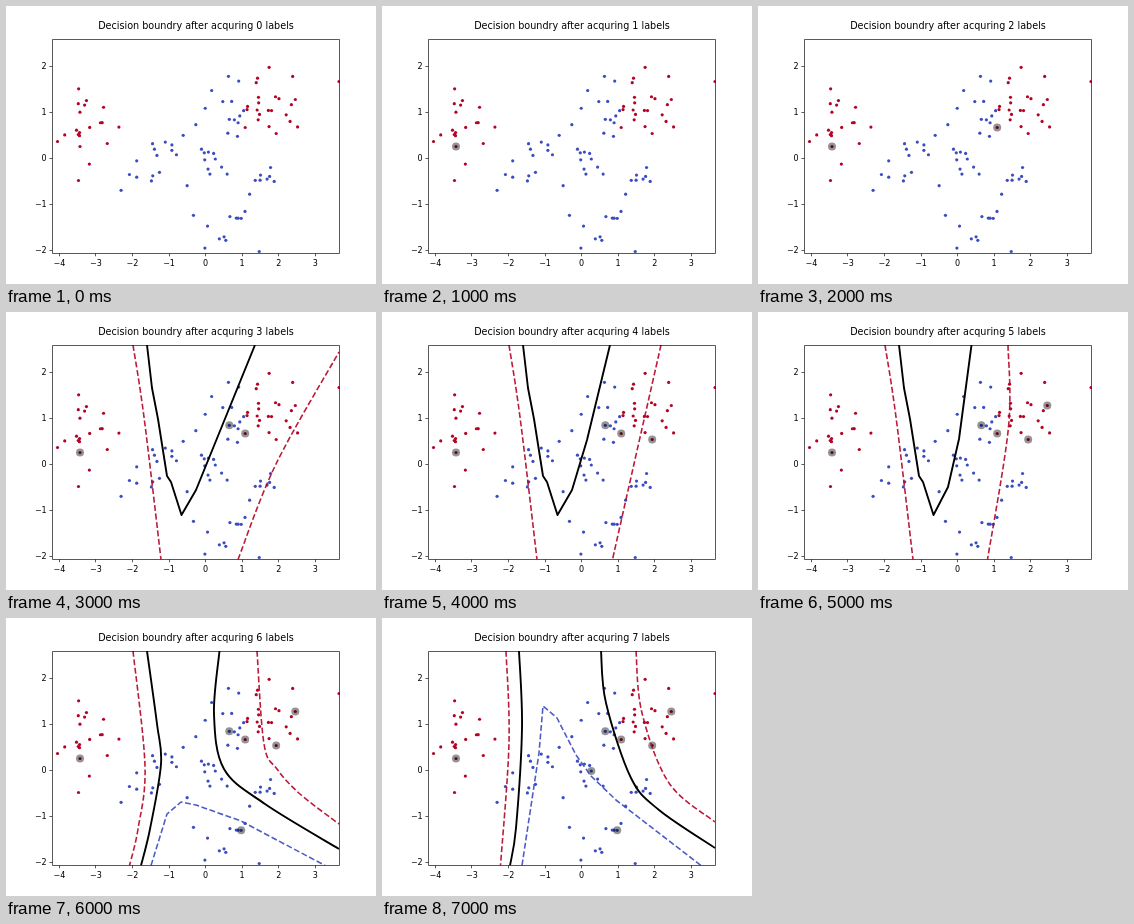
Animation of 370x278 px, one loop 8 s. Source, as an HTML page with a canvas:

```html
<!DOCTYPE html>
<html>
<head>
<meta charset="utf-8">
<style>
  html, body { margin: 0; width: 100%; height: 100%; overflow: hidden; background: #fff; }
  canvas { display: block; }
</style>
</head>
<body>
<canvas id="stage" width="370" height="278"></canvas>
<script>
const ctx = document.getElementById('stage').getContext('2d');
const STEP = 1000, STEPS = 8;
const RED = '#b40426', BLUE = '#3b4cc0', BLACK = '#000';
const TOP = 33, BOTTOM = 247.5, LEFT = 46.25, RIGHT = 333;
const toX = v => 199.6 + v * 36.55;
const toY = v => 152 - v * 46;

// Labelled points in the order they are acquired
const acquired = [
  { at: [74, 140.5], color: RED }, { at: [239.2, 121.5], color: RED },
  { at: [223.3, 113.3], color: BLUE }, { at: [270.2, 127.5], color: RED },
  { at: [289.3, 93.5], color: RED }, { at: [235.2, 212.3], color: BLUE },
  { at: [209.3, 153], color: BLUE }
];

function seededRandom(seed) {
  return () => {
    seed = (seed + 0x6D2B79F5) | 0;
    let t = Math.imul(seed ^ (seed >>> 15), 1 | seed);
    t = (t + Math.imul(t ^ (t >>> 7), 61 | t)) ^ t;
    return ((t ^ (t >>> 14)) >>> 0) / 4294967296;
  };
}

// Clouds of points, denser towards their centres
const random = seededRandom(7);
const scatter = () => random() + random() - 1;
const cloud = (color, count, x, y, rx, ry) => Array.from({ length: count }, () =>
  ({ at: [x + rx * scatter(), y + ry * scatter()], color }));

const dots = [
  ...cloud(BLUE, 15, 154, 160, 42, 36),
  ...cloud(BLUE, 13, 212, 92, 36, 48),
  ...cloud(BLUE, 10, 208, 146, 22, 34),
  ...cloud(BLUE, 8, 257, 162, 20, 40),
  ...cloud(BLUE, 11, 212, 217, 58, 36),
  ...cloud(RED, 19, 76, 130, 42, 58),
  ...cloud(RED, 20, 264, 92, 40, 60),
  { at: [RIGHT, 75.5], color: RED },
  ...acquired
];

// Contours: "smooth" ones are splines, others straight between key points
const smooth = (color, ...points) => ({ color, points, smooth: true });
const kinked = (color, ...points) => ({ color, points, smooth: false });

const leftMargin = smooth(RED, [127, TOP], [138, 105], [155, BOTTOM]);
const vee = (...rightArm) => kinked(BLACK,
  [141, TOP], [146, 76], [152, 107], [161, 164], [165, 170], [175.5, 203], ...rightArm);

const contours = {
  3: [leftMargin, vee([190, 178], [249, TOP]),
    smooth(RED, [232, BOTTOM], [270, 152], [RIGHT, 40])],
  4: [leftMargin, vee([190, 178], [205, 128], [228, TOP]),
    smooth(RED, [279, TOP], [252, 152], [230.5, BOTTOM])],
  5: [leftMargin, vee([190, 175], [201, 127], [213.5, TOP]),
    smooth(RED, [250, TOP], [250.5, 115], [229.5, BOTTOM])],
  6: [
    smooth(RED, [127, TOP], [139, 148], [132, 211], [123.5, BOTTOM]),
    smooth(RED, [251, TOP], [258, 126], [271, 151], [294, 176], [RIGHT, 206]),
    smooth(BLACK, [141, TOP], [151, 106], [155, 146], [144, 211], [135, BOTTOM]),
    smooth(BLACK, [213.5, TOP], [208, 96], [218, 151], [259, 186], [RIGHT, 231]),
    kinked(BLUE, [145, BOTTOM], [161, 196], [175, 184], [190, 187], [235, 203], [319, BOTTOM])
  ],
  7: [
    smooth(RED, [124, TOP], [127, 125], [118.5, BOTTOM]),
    smooth(RED, [254, TOP], [260, 95], [287, 165], [RIGHT, 204]),
    smooth(BLACK, [137, TOP], [140, 110], [134, 210], [128, BOTTOM]),
    smooth(BLACK, [219, TOP], [224, 85], [249, 160], [277, 192], [RIGHT, 230]),
    kinked(BLUE, [140, BOTTOM], [157, 135], [161, 88], [175, 100], [194, 137], [209, 158], [234, 182], [319, BOTTOM])
  ]
};

function disc([x, y], radius, color) {
  ctx.fillStyle = color;
  ctx.beginPath();
  ctx.arc(x, y, radius, 0, Math.PI * 2);
  ctx.fill();
}

// Catmull-Rom segment through b and c
function splineTo(a, b, c, d) {
  ctx.bezierCurveTo(
    b[0] + (c[0] - a[0]) / 6, b[1] + (c[1] - a[1]) / 6,
    c[0] - (d[0] - b[0]) / 6, c[1] - (d[1] - b[1]) / 6, ...c);
}

function drawContour({ color, points, smooth }) {
  const dashed = color !== BLACK;
  ctx.save();
  ctx.globalAlpha = dashed ? 0.9 : 1;
  ctx.setLineDash(dashed ? [5.9, 2.6] : []);
  ctx.strokeStyle = color;
  ctx.lineWidth = dashed ? 1.6 : 1.9;
  ctx.lineJoin = 'round';
  ctx.beginPath();
  ctx.moveTo(...points[0]);
  for (let i = 1; i < points.length; i++) {
    const before = points[i - 2] || points[i - 1];
    const after = points[i + 1] || points[i];
    if (smooth) splineTo(before, points[i - 1], points[i], after);
    else ctx.lineTo(...points[i]);
  }
  ctx.stroke();
  ctx.restore();
}

function drawAxes() {
  const tick = 2.8;
  const label = v => String(v).replace('-', '\u2212');
  ctx.strokeStyle = ctx.fillStyle = BLACK;
  ctx.lineWidth = 0.65;
  ctx.font = '8.03px "DejaVu Sans", sans-serif';
  ctx.beginPath();
  ctx.rect(46.5, 33.5, 287, 214);
  ctx.textAlign = 'center';
  for (let v = -4; v <= 3; v++) {
    const x = Math.floor(toX(v)) + 0.5;
    ctx.moveTo(x, BOTTOM);
    ctx.lineTo(x, BOTTOM + tick);
    ctx.fillText(label(v), toX(v), 260);
  }
  ctx.textAlign = 'right';
  for (let v = -2; v <= 2; v++) {
    const y = Math.floor(toY(v)) + 0.5;
    ctx.moveTo(LEFT, y);
    ctx.lineTo(LEFT - tick, y);
    ctx.fillText(label(v), 40.7, toY(v) + 3);
  }
  ctx.stroke();
}

function draw(count) {
  ctx.fillStyle = '#fff';
  ctx.fillRect(0, 0, 370, 278);

  ctx.save();
  ctx.beginPath();
  ctx.rect(LEFT, TOP, RIGHT - LEFT + 0.5, BOTTOM - TOP);
  ctx.clip();
  dots.forEach(({ at, color }) => disc(at, 1.6, color));
  acquired.slice(0, count).forEach(({ at }) => disc(at, 4, 'rgba(0,0,0,0.42)'));
  (contours[count] || []).forEach(drawContour);
  ctx.restore();

  drawAxes();
  ctx.font = '9.63px "DejaVu Sans", sans-serif';
  ctx.textAlign = 'center';
  ctx.fillText(`Decision boundry after acquring ${count} labels`, 190, 23.2);
}

function frame() {
  draw(Math.floor(performance.now() / STEP) % STEPS);
  requestAnimationFrame(frame);
}
frame();
</script>
</body>
</html>
```
